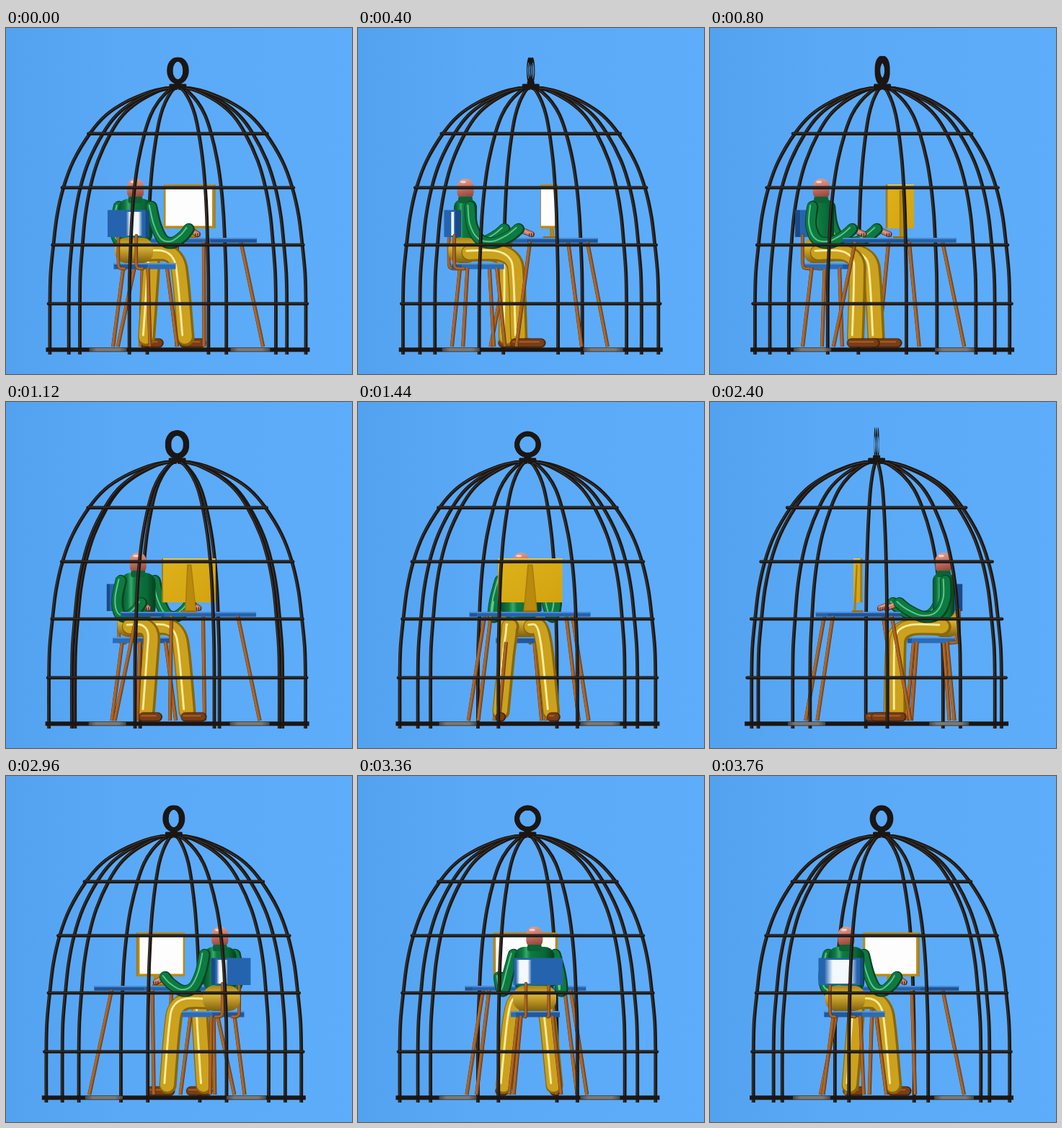
An HTML page that plays this animation: 480x480 px, repeating every 3.84 s.

```html
<!DOCTYPE html>
<html lang="en">
<head>
<meta charset="utf-8">
<title>Desk in a cage</title>
<style>
html, body { margin: 0; width: 100%; height: 100%; overflow: hidden; background: #5aa9f7; }
svg { display: block; width: 100vw; height: 100vh; }
</style>
</head>
<body>
<svg viewBox="0 0 480 480">
  <defs>
    <linearGradient id="sky"><stop offset="0" stop-color="#53a2f0"/><stop offset=".35" stop-color="#5aa9f7"/><stop offset="1" stop-color="#5dadfb"/></linearGradient>
    <linearGradient id="skin" x1="0" y1="0" x2=".15" y2="1"><stop offset="0" stop-color="#e2a392"/><stop offset=".4" stop-color="#cb7b6b"/><stop offset="1" stop-color="#8c4034"/></linearGradient>
    <linearGradient id="shirt"><stop offset="0" stop-color="#07502a"/><stop offset=".2" stop-color="#0e7a41"/><stop offset=".3" stop-color="#3aa86b"/><stop offset=".4" stop-color="#0d7a40"/><stop offset=".75" stop-color="#0a6936"/><stop offset="1" stop-color="#043d1f"/></linearGradient>
    <linearGradient id="hips" x1="0" y1="0" x2="0" y2="1"><stop offset="0" stop-color="#a88414"/><stop offset=".35" stop-color="#dcb638"/><stop offset="1" stop-color="#80600b"/></linearGradient>
    <linearGradient id="back" x1="0" y1="0" x2="1" y2="1"><stop offset="0" stop-color="#deb21a"/><stop offset="1" stop-color="#d2a310"/></linearGradient>
    <linearGradient id="shine"><stop offset="0" stop-color="#fff" stop-opacity="0"/><stop offset=".25" stop-color="#f4f8ff"/><stop offset=".75" stop-color="#f4f8ff"/><stop offset="1" stop-color="#fff" stop-opacity="0"/></linearGradient>
    <linearGradient id="gleam"><stop offset="0" stop-color="#4d4843"/><stop offset=".2" stop-color="#7d7871"/><stop offset=".8" stop-color="#7d7871"/><stop offset="1" stop-color="#4d4843"/></linearGradient>
  </defs>
  <rect width="480" height="480" fill="url(#sky)"/>
  <g id="scene"></g>
</svg>
<script>
const LOOP = 3840, STEP = 80, AXIS = 235.5, RAD = Math.PI / 180;
const IRON = '#1b1613', IRON_LIT = '#4b443d';
const COPPER = ['#54290d', '#a05a1e', '#d08a42'];
const PANTS = ['#896709', '#cba11e', '#fbec9c'];
const GREEN = ['#054523', '#0d7a40', '#5cc48c'];
const SHOE = ['#4a230b', '#7a3d14', '#a9652f'];
const SKIN = ['#5d2c22', '#c98070', '#efb9a8'];
// cage outline: radius, height
const PROFILE = [[3, 83], [20, 84], [40, 89], [73, 103], [100, 121], [122, 146], [145, 184],
  [159, 221], [168, 260], [173, 300], [177, 341], [178, 382], [178, 453]];
const RINGS = [[126, 146.6], [162.5, 221.5], [176, 301], [181.5, 382.5]];
const scene = document.getElementById('scene');

const n = v => v.toFixed(1);

function rect(x1, x2, y1, y2, fill, extra = '') {
  const x = Math.min(x1, x2);
  return `<rect x="${n(x)}" y="${n(y1)}" width="${n(Math.abs(x2 - x1))}" height="${n(y2 - y1)}" fill="${fill}" ${extra}/>`;
}

// smooth curve through points
function curve(p) {
  let d = `M${n(p[0][0])} ${n(p[0][1])}`;
  for (let i = 0; i < p.length - 1; i++) {
    const a = p[i - 1] || p[i], b = p[i], c = p[i + 1], e = p[i + 2] || c;
    d += `C${n(b[0] + (c[0] - a[0]) / 6)} ${n(b[1] + (c[1] - a[1]) / 6)} ` +
      `${n(c[0] - (e[0] - b[0]) / 6)} ${n(c[1] - (e[1] - b[1]) / 6)} ${n(c[0])} ${n(c[1])}`;
  }
  return d;
}

function oval(cx, cy, rx, ry) {
  return `M${n(cx - rx)} ${cy}a${n(rx)} ${ry} 0 1 0 ${n(2 * rx)} 0a${n(rx)} ${ry} 0 1 0 ${n(-2 * rx)} 0z`;
}

function line(d, w, color, dx = 0, dy = 0, cap = 'round') {
  return `<path d="${d}" transform="translate(${n(dx)} ${n(dy)})" fill="none" stroke="${color}" ` +
    `stroke-width="${n(w)}" stroke-linecap="${cap}" stroke-linejoin="round"/>`;
}

function tube(pts, w, [dark, mid, light], cap) {
  const d = curve(pts);
  return line(d, w, dark, 0, 0, cap) + line(d, w * .8, mid, -w * .05, -w * .03, cap) +
    line(d, w * .12, light, -w * .2, -w * .12, cap);
}

function draw(time) {
  const turn = time / LOOP * 360;
  const deg = (turn + 219) % 360, a = deg * RAD;
  const sin = Math.sin(a), cos = Math.cos(a);
  const parts = [];

  // f: forward of the sitter, s: sideways, y: screen height
  const X = (f, s) => AXIS - f * sin + s * cos;
  const P = ([f, s, y]) => [X(f, s), y];
  const add = (f, s, svg) => parts.push([f * cos + s * sin, svg]);
  const box = (f0, f1, s0, s1, y0, y1, face, side) => {
    const f = cos > 0 ? f1 : f0, s = sin > 0 ? s1 : s0;
    return rect(X(f, s0), X(f, s1), y0, y1, face) + rect(X(f0, s), X(f1, s), y0, y1, side);
  };
  const legs = (fc, sc, bot, top, y0, w) => {
    for (const i of [-1, 1]) for (const j of [-1, 1]) {
      const p = [[fc + i * top[0], sc + j * top[1], y0], [fc + i * bot[0], sc + j * bot[1], 442]];
      add(fc + i * bot[0], sc + j * bot[1], tube(p.map(P), w, COPPER, 'butt'));
    }
  };

  // desk
  legs(30, -2, [65, 77], [41, 57], 297, 5);
  add(30, 0, box(-21, 81, -79, 79, 291, 297.8, '#2563ad', '#1f559a') +
    box(-21, 81, -79, 79, 291, 293, '#4a8bd2', '#4a8bd2'));

  // screen and stand
  const stand = [[32, -3, 226], [32, 3, 226], [35, 9, 291], [35, -9, 291]].map(P);
  add(36, 0, `<path d="M${stand.map(p => p.map(n)).join('L')}Z" fill="#b98a0d" stroke="#a87c0d" stroke-width="1.5" stroke-linejoin="round"/>` +
    box(24, 38, -9, 9, 289, 291.5, '#9a6d10', '#9a6d10'));
  let screen = box(29, 32, -45, 45, 217, 278, cos > 0 ? 'url(#back)' : '#b98a16', '#a67a10');
  if (cos < 0) screen += rect(X(29, -41.5), X(29, 41.5), 221, 274.5, '#fdfdfd');
  else screen += rect(X(32, -45), X(32, 45), 217, 218.2, '#eccb58');
  add(30, 0, screen);

  // chair
  legs(-71, -3, [30, 33], [21, 22], 333, 5);
  add(-72, 0, box(-102, -42, -34, 28, 326, 334.5, '#20589f', '#2b6cb8') +
    box(-102, -42, -34, 28, 326, 328, '#5594d8', '#5594d8'));
  for (const s of [-18, 14]) {
    add(-109, s, tube([[-109, s, 288], [-109, s, 325], [-106, s, 333], [-95, s, 334]].map(P), 4.5, COPPER));
  }
  let rest = box(-112, -104, -37, 31, 252.5, 290, '#2464ae', '#1a4a88');
  if (cos < 0) {
    const size = .85 * Math.max(.38, 1 - Math.abs(deg - 210) / 18);
    const mid = Math.max(.2, Math.min(.75, .5 + (deg - 210) / 45));
    const l = Math.min(X(-112, -37), X(-112, 31)), w = -68 * cos;
    rest += rect(l + w * (mid - size / 2), l + w * (mid + size / 2), 255, 288, 'url(#shine)');
  }
  add(-110, 0, rest);

  // sitter
  const wide = (u, v) => Math.hypot(u * cos, v * sin);
  const hx = X(-89, 0), hipX = X(-92, 0), tw = wide(28, 15), hw = wide(30, 20);
  add(-92, 0, rect(hipX - hw, hipX + hw, 291, 326, 'url(#hips)', 'rx="15"'));
  add(-89, 0, rect(hx - 11.5, hx + 11.5, 209, 239, 'url(#skin)', 'rx="11"') +
    `<ellipse cx="${n(hx - 3)}" cy="213.5" rx="4" ry="1.8" fill="#f6d0c4"/>` +
    rect(hx - tw, hx + tw, 237, 300, 'url(#shirt)', `rx="${n(Math.min(14, tw * .75))}"`) +
    rect(hx - 10, hx + 10, 234, 243, '#0b6435', 'rx="3"'));
  for (const k of [-1, 1]) {
    add(-40, k * 24, tube([[-86, k * 15, 312], [-46, k * 20, 312], [-26, k * 23, 323],
      [-22, k * 27, 350], [-21, k * 35, 429]].map(P), 24, PANTS));
    add(-8, k * 36, tube([[-27, k * 36, 437], [10, k * 38, 437]].map(P), 13, SHOE));
    const [x, y] = P([-5, k * 43, 285]);
    add(-60, k * 40, tube([[-20, k * 42, 280], [-5, k * 43, 286]].map(P), 8, SKIN) +
      [-3, 0, 3].map(d => line(`M${n(x + d)} ${y}v4`, 1.2, '#4c231b')).join('') +
      tube([[-89, k * 29, 248], [-88, k * 36, 274], [-77, k * 40, 294],
        [-57, k * 41, 298], [-36, k * 42, 289], [-23, k * 42, 279]].map(P), 16.5, GREEN));
  }

  // cage
  const cx = 235.4 + 4.3 * Math.cos((turn - 45) * RAD);
  let behind = '', front = '';
  for (let i = 0; i < 10; i++) {
    const t = (turn + 4.2 + 36 * i) * RAD, c = Math.cos(t);
    const d = curve(PROFILE.map(([r, y]) => [cx + r * c, y]));
    const rib = line(d, 4.8, IRON, 0, 0, 'butt') + line(d, 1, IRON_LIT, -.8, 0, 'butt');
    if (Math.sin(t) > 0) front += rib; else behind += rib;
  }
  for (const [r, y] of RINGS) {
    const d = `M${n(cx - r + 2)} ${y}H${n(cx + r - 2)}`;
    front += line(d, 4.6, IRON) + line(d, .9, IRON_LIT, 0, -.8);
  }
  front += rect(cx - 183, cx + 183, 443.3, 449.3, IRON) +
    rect(cx - 123, cx - 71, 443.8, 448.6, 'url(#gleam)') +
    rect(cx + 73, cx + 128, 443.8, 448.6, 'url(#gleam)') +
    rect(cx - 12, cx + 12, 77.5, 84, IRON, 'rx="1.5"') +
    rect(cx - 5, cx + 5, 74, 79, IRON);

  // flat hanging ring with some depth
  const t = (turn - 138) * RAD, flat = Math.max(.02, Math.abs(Math.cos(t)));
  for (const depth of [-2.5, 0, 2.5]) {
    const x = cx + depth * Math.sin(t);
    front += `<path d="${oval(x, 59, 18.2 * flat, 18.2)}${oval(x, 59, 11.4 * flat, 11.4)}" fill="${IRON}" fill-rule="evenodd"/>`;
  }

  parts.sort((p, q) => p[0] - q[0]);
  scene.innerHTML = behind + parts.map(p => p[1]).join('') + front;
}

let last = -1;
function tick() {
  const step = Math.floor(performance.now() % LOOP / STEP);
  if (step !== last) draw((last = step) * STEP);
  requestAnimationFrame(tick);
}
tick();
</script>
</body>
</html>
```
